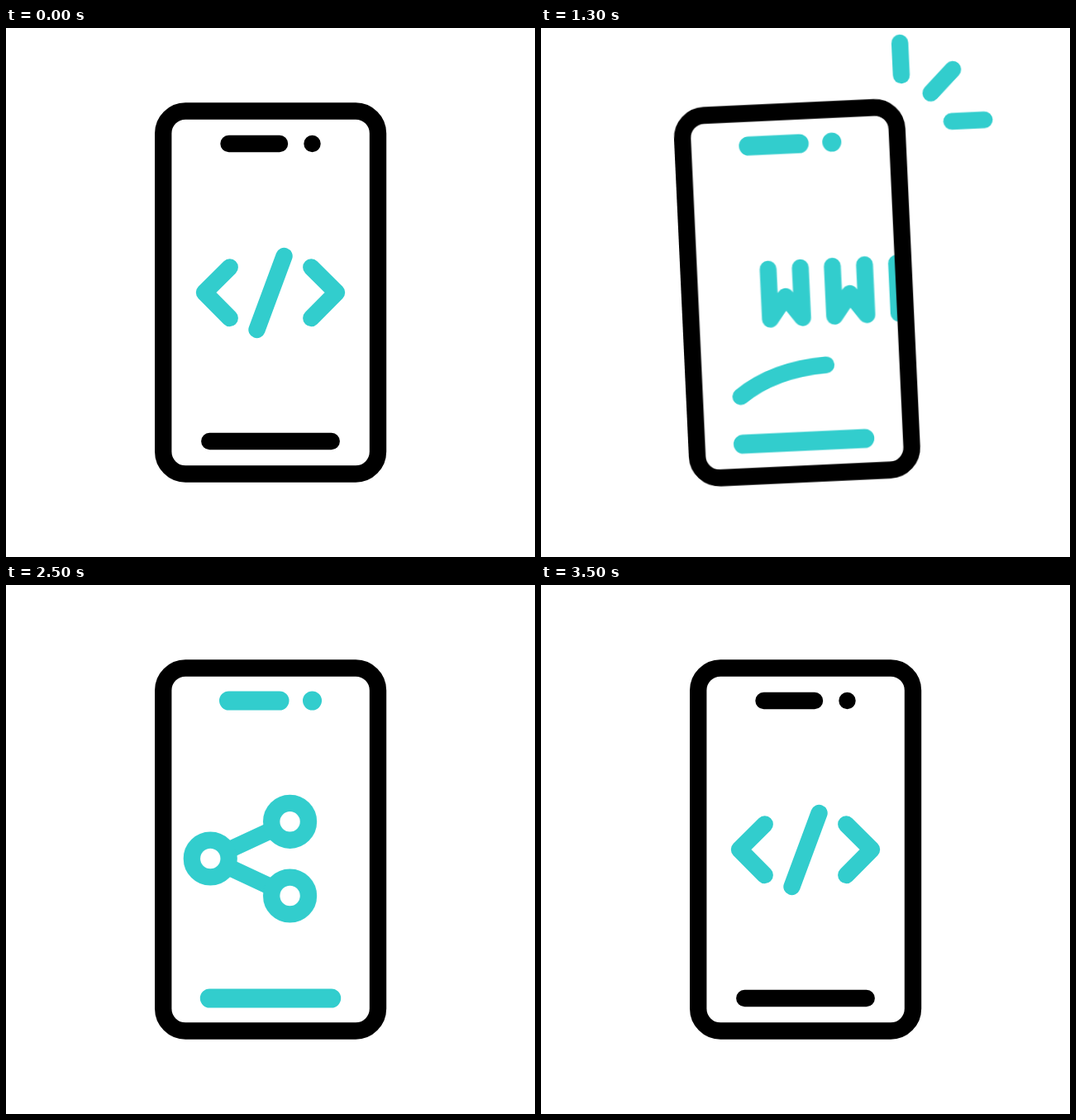
Write an HTML page that moves like this. It is 640x640 px and loops after 3.6 s.

```html
<!DOCTYPE html>
<html lang="en">
<head>
<meta charset="utf-8">
<title>Phone swipe</title>
<style>
  :root { --teal: #32cdcd; --loop: 3600ms; --smooth: cubic-bezier(.333, 0, .667, 1); }
  html, body { margin: 0; width: 100%; height: 100%; overflow: hidden; background: #fff; }
  svg { display: block; width: 100vw; height: 100vh; }
  path, rect, circle { fill: none; stroke: var(--teal); stroke-width: 20.4; stroke-linecap: round; stroke-linejoin: round; }
  .node { fill: #fff; }
  .case { stroke: #000; }

  .phone { transform-origin: 320px 540px; animation: tilt var(--loop) var(--smooth) infinite; }
  .strip { animation: slide var(--loop) linear infinite; }
  .bar { animation: flash var(--loop) step-end infinite; }
  .marks { animation: show var(--loop) step-end infinite; }
  .marks path { stroke-dasharray: 1 3; animation: ray var(--loop) var(--smooth) infinite; }
  .marks .swipe { animation-name: swipe; }

  @keyframes tilt {
    0%, 16.667%, 24.583%, 41.25%, 50%, 66.667%, 100% { transform: rotate(0deg); }
    8.333%, 32.917% { transform: rotate(-4deg); }
    58.333% { transform: rotate(4deg); }
  }

  /* left, left, then all the way back */
  @keyframes slide {
    0% { transform: translateX(0); animation-timing-function: cubic-bezier(.333, 0, .52, 1); }
    16.667% { transform: translateX(-262px); }
    25% { transform: translateX(-262px); animation-timing-function: cubic-bezier(.333, 0, .52, 1); }
    41.667% { transform: translateX(-621px); }
    50% { transform: translateX(-621px); animation-timing-function: cubic-bezier(.333, .05, .667, .46); }
    52.778% { transform: translateX(-590px); animation-timing-function: cubic-bezier(.333, .31, .667, .67); }
    61.667% { transform: translateX(-419px); animation-timing-function: cubic-bezier(.333, .39, .667, .706); }
    77.778% { transform: translateX(-156px); animation-timing-function: cubic-bezier(.333, .47, .667, 1); }
    93.056%, 100% { transform: translateX(0); }
  }

  @keyframes flash {
    0%, 16.667%, 41.667%, 97.222%, 100% { stroke: #000; stroke-width: 20.4; }
    8.333%, 33.333%, 58.333% { stroke: var(--teal); stroke-width: 23; }
  }

  @keyframes show {
    0%, 16.6%, 41.6%, 66.6%, 100% { opacity: 0; }
    .3%, 25.3%, 50.3% { opacity: 1; }
  }

  /* dash offset 1 to 0 draws the line, 0 to -1 wipes it from its start */
  @keyframes ray {
    0%, 16.668%, 25%, 41.668%, 50% { stroke-dashoffset: 1; }
    8.333%, 33.333%, 58.333% { stroke-dashoffset: 0; }
    16.667%, 41.667%, 66.667%, 100% { stroke-dashoffset: -1; }
  }
  @keyframes swipe {
    0%, 16.668%, 25% { stroke-dashoffset: -1; }
    8.333%, 33.333%, 58.333% { stroke-dashoffset: 0; }
    16.667%, 41.667%, 50% { stroke-dashoffset: 1; }
    66.667%, 100% { stroke-dashoffset: -1; }
  }
</style>
</head>
<body>
<svg viewBox="0 0 640 640">
  <defs>
    <clipPath id="screen"><rect x="190" y="100" width="260" height="440" rx="27"/></clipPath>
    <path id="w" d="M0 290V350.5L19.5 324L39 350.5V290"/>
  </defs>
  <g class="phone">
    <g clip-path="url(#screen)">
      <g class="strip">
        <path d="M270.7 289.5L240 320L270.7 351M336.5 276L303.5 365M369.3 289.5L400 320L369.3 351"/>
        <g transform="translate(262 0)">
          <path d="M363.6 286.3L267.3 331L363.6 376"/>
          <circle class="node" cx="267.3" cy="331" r="22.4"/>
          <circle class="node" cx="363.6" cy="286.3" r="22.4"/>
          <circle class="node" cx="363.6" cy="376" r="22.4"/>
        </g>
        <g transform="translate(843.6 0)">
          <use href="#w"/>
          <use href="#w" x="77.8"/>
          <use href="#w" x="155.6"/>
        </g>
      </g>
    </g>
    <rect class="case" x="190.2" y="100.5" width="259.8" height="439" rx="27"/>
    <path class="bar" d="M269.5 140H331M370.5 140h.01M246.3 500H393.7"/>
    <g class="marks">
      <path pathLength="1" d="M458.3 77V24"/>
      <path pathLength="1" d="M483 96L520.7 59"/>
      <path pathLength="1" d="M502.5 121.6H556"/>
      <path class="swipe" pathLength="1" d="M246.3 442.4Q300 402.5 391 409.7"/>
    </g>
  </g>
</svg>
</body>
</html>
```
